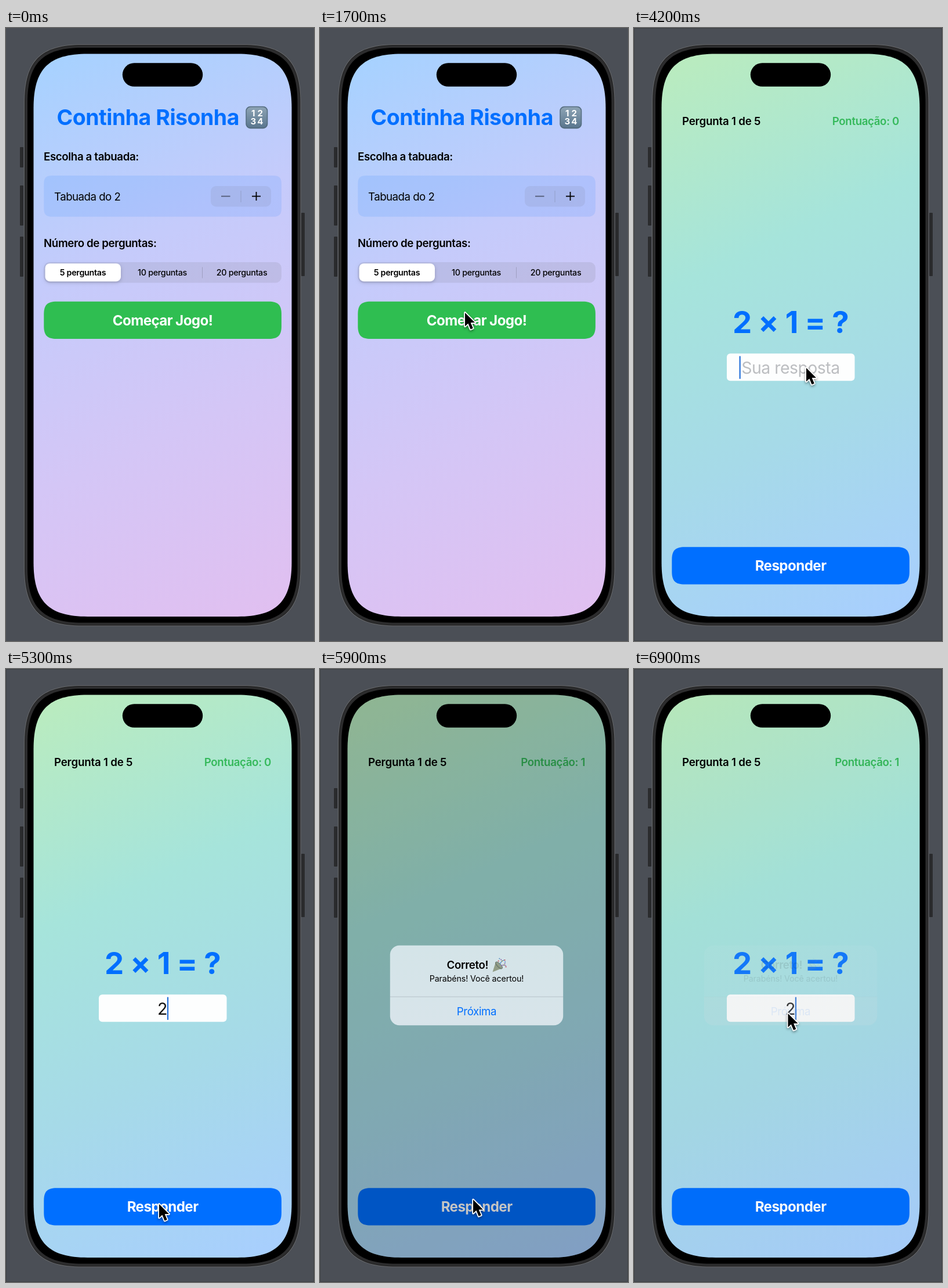
Write an HTML page with a canvas that moves like this. It is 531 by 1055 pixels and loops after 7 s.

```html
<!DOCTYPE html>
<html lang="pt">
<head>
<meta charset="utf-8">
<title>Continha Risonha</title>
<style>
  html, body { margin: 0; width: 100%; height: 100%; overflow: hidden; background: #4b4f56; }
  canvas { display: block; width: 531px; height: 1055px; }
</style>
</head>
<body>
<canvas id="stage"></canvas>
<script>
const W = 531, H = 1055, LOOP = 7000, STEP = 100;
const BLUE = '#006fff';
const canvas = document.getElementById('stage');
const ctx = canvas.getContext('2d');
const dpr = window.devicePixelRatio || 1;
canvas.width = W * dpr;
canvas.height = H * dpr;

const ramp = (t, start, length) => Math.min(1, Math.max(0, (t - start) / length));
const smooth = x => x * x * (3 - 2 * x);

function fade(alpha, draw) {
  if (alpha <= 0) return;
  ctx.save();
  ctx.globalAlpha *= alpha;
  draw();
  ctx.restore();
}

function box(x, y, w, h, r, fill) {
  ctx.beginPath();
  ctx.roundRect(x, y, w, h, r);
  ctx.fillStyle = fill;
  ctx.fill();
}

function rect(x, y, w, h, fill) {
  ctx.fillStyle = fill;
  ctx.fillRect(x, y, w, h);
}

function text(str, x, y, size, weight, color, align = 'left', track = -0.02) {
  ctx.font = `${weight} ${size}px Inter, "Open Sans", sans-serif`;
  ctx.letterSpacing = size * track + 'px';
  ctx.textAlign = align;
  ctx.fillStyle = color;
  ctx.fillText(str, x, y);
}

// Rounded rectangle with continuous corners
function squircle(x, y, w, h, r, fill) {
  const e = r * 1.28, k = r * 0.354, X = x + w, Y = y + h;
  ctx.beginPath();
  ctx.moveTo(x + e, y);
  ctx.lineTo(X - e, y);
  ctx.bezierCurveTo(X - k, y, X, y + k, X, y + e);
  ctx.lineTo(X, Y - e);
  ctx.bezierCurveTo(X, Y - k, X - k, Y, X - e, Y);
  ctx.lineTo(x + e, Y);
  ctx.bezierCurveTo(x + k, Y, x, Y - k, x, Y - e);
  ctx.lineTo(x, y + e);
  ctx.bezierCurveTo(x, y + k, x + k, y, x + e, y);
  ctx.closePath();
  if (!fill) return;
  ctx.fillStyle = fill;
  ctx.fill();
}

const shell = (inset, r, fill) =>
  squircle(31 + inset, 28 + inset, 477.5 - 2 * inset, 1001.5 - 2 * inset, r, fill);

function backdrop(colors) {
  const g = ctx.createLinearGradient(47.5, 44.5, 492.5, 1013);
  [0, 0.35, 0.65, 1].forEach((stop, i) => g.addColorStop(stop, colors[i]));
  rect(47, 44, 447, 970, g);
}

function phone(t) {
  rect(0, 0, W, H, '#4b4f56');
  if (t >= 3000) {
    ctx.strokeStyle = '#3d4045';
    ctx.lineWidth = 1;
    ctx.strokeRect(0.5, 0.5, W - 1, H - 1);
  }
  for (const [x, y, h] of [[24, 205, 35], [24, 271, 69], [24, 359, 69], [509, 318, 109]]) {
    box(x, y, 6, h, 1, '#2a2b2d');
  }
  shell(0, 79, '#68696b');
  shell(1, 78, '#1e1f20');
  shell(2, 77, '#2c2c2d');
  shell(6, 74, '#000');
}

function button(label, y, base, color, alpha) {
  fade(alpha, () => squircle(65.3, y, 409.6, 64.3, 17, color));
  fade(alpha ** 1.4, () => text(label, 270, base, 24.2, 700, '#fff', 'center', -0.025));
}

// Opacity while a button is held and let go
const held = (t, down, up) =>
  1 - 0.8 * ramp(t, down, 70) * (1 - ramp(t, up, 320));

function numbersIcon(x, y) {
  const g = ctx.createLinearGradient(0, y, 0, y + 38);
  g.addColorStop(0, '#8fa5b6');
  g.addColorStop(1, '#58758d');
  box(x, y, 38, 38.5, 8, '#536b7e');
  box(x + 1.5, y + 1.5, 35, 35, 7, g);
  [...'1234'].forEach((d, i) =>
    text(d, x + 13 + 12 * (i % 2), y + 17.2 + 14.3 * (i >> 1), 15, 700, '#fff', 'center', 0));
}

function menu(t) {
  backdrop(['#a5d2ff', '#c5cbfb', '#d4c6f6', '#e1bff0']);
  text('Continha Risonha', 87.5, 167, 37.4, 700, BLUE, 'left', -0.012);
  numbersIcon(413.3, 134.7);

  text('Escolha a tabuada:', 65, 227.5, 18.7, 600, '#000');
  squircle(65.3, 254, 409.6, 70.8, 11, 'rgba(0,112,255,.11)');
  text('Tabuada do 2', 83, 296.5, 18.7, 400, '#000', 'left', -0.028);
  box(353, 272, 104, 35.5, 9, 'rgba(118,118,128,.13)');
  rect(371, 288.7, 15.5, 1.8, 'rgba(0,0,0,.5)');
  rect(404.5, 280, 1, 20, 'rgba(60,60,67,.2)');
  rect(424, 288.7, 15, 1.8, '#000');
  rect(430.6, 282, 1.8, 15, '#000');

  text('Número de perguntas:', 65, 376.5, 18.7, 600, '#000');
  box(65.3, 403, 409.6, 35.5, 10, 'rgba(118,118,128,.16)');
  ctx.save();
  ctx.shadowColor = 'rgba(0,0,0,.2)';
  ctx.shadowBlur = 6 * dpr;
  ctx.shadowOffsetY = 2 * dpr;
  box(67.5, 405.2, 130.5, 31, 8, '#fff');
  ctx.restore();
  rect(338, 411.5, 1, 19, 'rgba(60,60,67,.22)');
  ['5', '10', '20'].forEach((n, i) =>
    text(n + ' perguntas', 132.5 + 137 * i, 426, 14.3, i ? 500 : 600, '#000', 'center'));

  button('Começar Jogo!', 470.8, 512, '#2fbe51', held(t, 1850, 1980));
}

function popper(x, y) {
  ctx.save();
  ctx.translate(x, y);
  ctx.beginPath();
  ctx.moveTo(0.5, 24.5);
  ctx.lineTo(6, 7.5);
  ctx.quadraticCurveTo(14, 10, 17, 18);
  ctx.closePath();
  ctx.fillStyle = '#929d86';
  ctx.fill();
  ctx.strokeStyle = '#6c796e';
  ctx.lineWidth = 1.3;
  ctx.beginPath();
  ctx.ellipse(11.5, 13, 2.8, 7.6, -0.78, 0, 7);
  ctx.stroke();
  ctx.beginPath();
  ctx.moveTo(13, 12);
  ctx.quadraticCurveTo(15, 5, 21, 4);
  ctx.strokeStyle = '#5d8fc4';
  ctx.stroke();
  ctx.beginPath();
  ctx.moveTo(15, 14);
  ctx.quadraticCurveTo(19, 11, 24, 14);
  ctx.strokeStyle = '#8a6fb0';
  ctx.stroke();
  const tints = ['#c65b63', '#5d8fc4', '#8a6fb0', '#a3a25e'];
  for (let i = 0; i < 9; i++) {
    const a = -1.9 + i * 0.28, d = 9 + (i * 5) % 7;
    box(12 + d * Math.cos(a) * 0.8, 11 + d * Math.sin(a) * 0.75, 2, 2, 0.7, tints[i % 4]);
  }
  ctx.restore();
}

function alertBox(t, scale) {
  ctx.translate(270, 544.5);
  ctx.scale(scale, scale);
  ctx.translate(-270, -544.5);
  const g = ctx.createLinearGradient(0, 476, 0, 613);
  g.addColorStop(0, '#d4e4e8');
  g.addColorStop(1, '#d8e4ea');
  box(120.8, 475.7, 298.4, 137.6, 16, g);
  if (t >= 6600) box(120.8, 564, 298.4, 49.3, [0, 0, 16, 16], '#cdd2d4');
  rect(120.8, 563.7, 298.4, 0.8, 'rgba(60,60,67,.25)');
  text('Correto!', 218.5, 516, 18.7, 600, '#000');
  popper(297, 497);
  text('Parabéns! Você acertou!', 270, 538, 14.3, 400, '#000', 'center', -0.01);
  text('Próxima', 270, 596, 18.7, 400, BLUE, 'center');
}

function game(t) {
  const shown = 1 - (1 - ramp(t, 5450, 420)) ** 3;
  const p = shown * (1 - ramp(t, 6740, 230)) ** 2;
  const typed = t >= 4650;
  const score = t >= 5450 ? 1 : 0;

  backdrop(['#bbecbd', '#a6e4db', '#a6dae8', '#a8ceff']);
  text('2 × 1 = ?', 270, 525, 52.7, 700, BLUE, 'center', -0.014);
  box(160, 560.3, 220.5, 47, 6, '#fdfefe');
  if (typed) text('2', 269.5, 595, 28.5, 400, '#111', 'center');
  else text('Sua resposta', 270, 595, 28.5, 400, '#bcbec1', 'center');
  if (t >= 3400 && (t < 5450 || t >= 6800)) {
    box(typed ? 277.8 : 181.5, 564.5, 2.3, 39.5, 1, '#2a73d9');
  }
  button('Responder', 893.3, 934, BLUE, held(t, 5380, 5480));
  text('Pontuação: ' + score, 457, 167, 18.7, 600, '#35b95b', 'right');
  fade(p * 0.23, () => rect(47, 44, 447, 970, '#000'));
  text('Pergunta 1 de 5', 83, 167, 18.7, 600, '#000', 'left', -0.01);
  fade(p, () => alertBox(t, 1.2 - 0.2 * shown));
}

// time, x, y of the pointer tip
const route = [
  [600, 300, 37], [1300, 249, 487.5], [2150, 249, 487.5], [2700, 217, 569.5],
  [3500, 217, 569.5], [4000, 296, 582.5], [4750, 296, 582.5], [5250, 263, 918.5],
  [5850, 263, 918.5], [6400, 264.5, 590.5], [LOOP, 264.5, 590.5]
];

function pointer(t) {
  const i = route.findIndex(stop => stop[0] > t);
  if (i < 1) return;
  const [t0, x0, y0] = route[i - 1], [t1, x1, y1] = route[i];
  const k = smooth(ramp(t, t0, t1 - t0));
  ctx.save();
  ctx.translate(x0 + (x1 - x0) * k, y0 + (y1 - y0) * k);
  ctx.beginPath();
  [[1, 2.5], [1, 26], [6.4, 21], [10.6, 31], [14.8, 29.2], [10.7, 19.6], [18, 19.6]]
    .forEach(([x, y]) => ctx.lineTo(x, y));
  ctx.closePath();
  ctx.lineWidth = 3.6;
  ctx.lineJoin = 'round';
  ctx.strokeStyle = '#fff';
  ctx.shadowColor = 'rgba(0,0,0,.4)';
  ctx.shadowBlur = 4 * dpr;
  ctx.shadowOffsetY = 2 * dpr;
  ctx.stroke();
  ctx.shadowColor = 'transparent';
  ctx.fillStyle = '#000';
  ctx.fill();
  ctx.restore();
}

function draw(t) {
  ctx.setTransform(dpr, 0, 0, dpr, 0, 0);
  phone(t);
  ctx.save();
  squircle(47.5, 44.5, 445, 968.5, 73);
  ctx.clip();
  const swap = ramp(t, 2000, 250);
  if (swap < 1) menu(t);
  fade(swap, () => game(t));
  ctx.restore();
  box(200.8, 60.3, 138.4, 40.5, 20.2, '#000');
  pointer(t);
}

const began = performance.now();
function tick() {
  const t = (performance.now() - began) % LOOP;
  draw(Math.floor(t / STEP) * STEP);
  requestAnimationFrame(tick);
}
tick();
</script>
</body>
</html>
```
